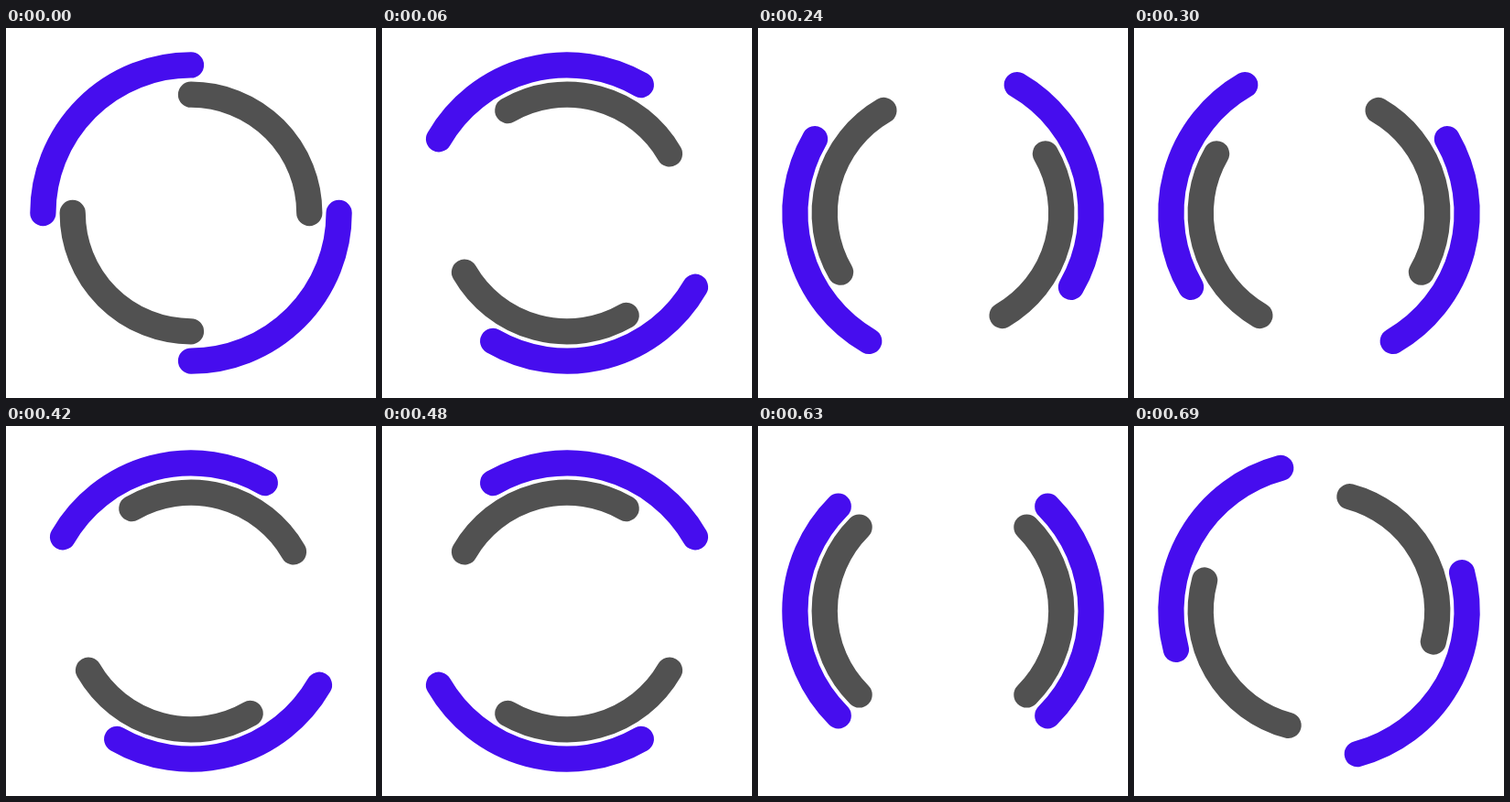
These frames come from a looping animation (404 by 404 pixels, 720 ms). An HTML page with a canvas:

```html
<!DOCTYPE html>
<html lang="en">
<head>
<meta charset="utf-8">
<title>Double ring spinner</title>
<style>
  html, body { margin: 0; width: 100%; height: 100%; overflow: hidden; background: #fff; }
  canvas { display: block; width: 404px; height: 404px; }
</style>
</head>
<body>
<canvas id="stage" width="404" height="404"></canvas>
<script>
const SIZE = 404;
const LOOP = 720;
const STEP = 30;
const ctx = document.getElementById('stage').getContext('2d');

// Two opposite quarter arcs with round ends; radius is in percent of the stage.
function drawRing(radius, color, angle) {
  ctx.strokeStyle = color;
  for (const start of [angle, angle + Math.PI]) {
    ctx.beginPath();
    ctx.arc(SIZE / 2, SIZE / 2, SIZE * radius / 100, start, start + Math.PI / 2);
    ctx.stroke();
  }
}

function draw(time) {
  const t = Math.floor((time % LOOP) / STEP) * STEP;
  const turn = 2 * Math.PI * t / LOOP;
  ctx.fillStyle = '#fff';
  ctx.fillRect(0, 0, SIZE, SIZE);
  ctx.lineWidth = SIZE * 0.07;
  ctx.lineCap = 'round';
  drawRing(40, '#460dee', turn);
  drawRing(32, '#515151', Math.PI / 2 - turn);
}

const origin = performance.now();
function tick() {
  draw(performance.now() - origin);
  requestAnimationFrame(tick);
}
tick();
</script>
</body>
</html>
```
